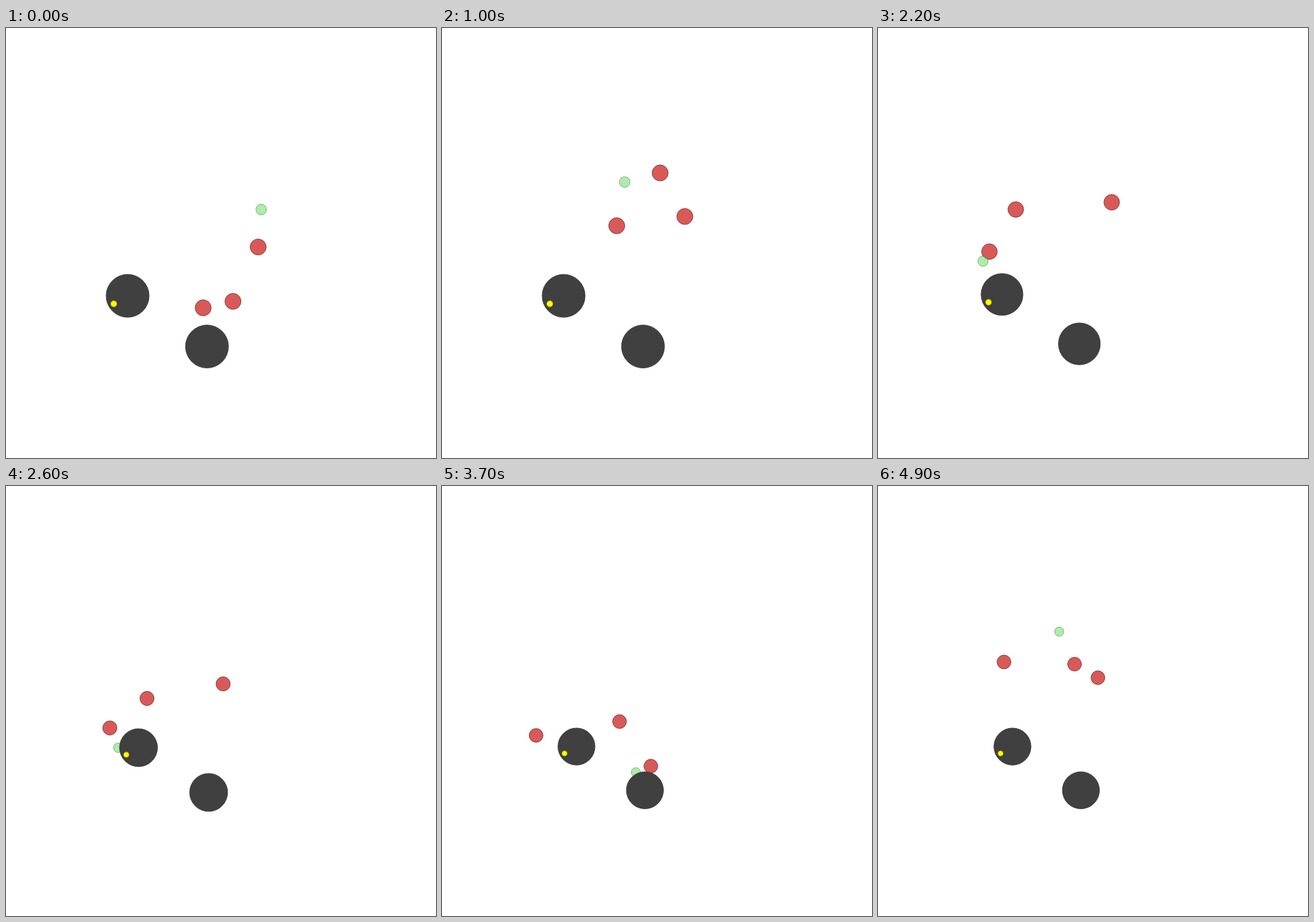
Write an HTML page with a canvas that moves like this. It is 700 by 700 pixels and loops after 5 s.

```html
<!DOCTYPE html>
<html>
<head>
<meta charset="utf-8">
<style>
html, body { margin: 0; height: 100%; overflow: hidden; background: #fff; }
canvas { display: block; }
</style>
</head>
<body>
<canvas id="stage" width="700" height="700"></canvas>
<script>
const ctx = document.getElementById('stage').getContext('2d');
const STEP = 100, STEPS = 50;
const obstacles = [[-152, 86], [-22.8, 168.5]];
const food = [-174.5, 99];

// Key steps shared by all bodies; positions are relative to the stage centre
const keys = [0, 5, 15, 22, 30, 37, 42, 49];
const chaser = { r: 13.1, fill: '#d95959', line: 'rgba(90,36,36,.75)' };
const bodies = [
  { ...chaser, x: [60.5, 60.5, -66, -129, -125.7, -70.7, -48, -34.8],
    y: [6.5, -62.6, -128.5, -56, 36, 38.8, 22, -69.6] },
  { ...chaser, x: [19.5, 19.5, 65, 31.3, -17.4, -11.6, -6, 9.3],
    y: [95, 26, -87.5, -68, 18, 123, 53, -44] },
  { ...chaser, x: [-29, -28.8, -116, -173, -228, -228.2, -211, -168],
    y: [105.5, 36.4, -56.5, 14.4, 73, 65, 21, -73.6] },
  { r: 8.7, fill: 'rgba(89,217,89,.5)', line: 'rgba(44,108,44,.5)',
    x: [65.5, 30, -136.5, -183.8, -155, -40, -48, -63.8],
    y: [-54.5, -111, -50.5, 30.3, 130.3, 134.5, 20, -131] }
];

const slope = (p, i) => (p[i + 1] - p[i]) / (keys[i + 1] - keys[i]);

function tangent(p, i) {
  if (i === 0) return slope(p, 0);
  if (i === keys.length - 1) return slope(p, i - 1);
  const before = keys[i] - keys[i - 1], after = keys[i + 1] - keys[i];
  return (slope(p, i - 1) * after + slope(p, i) * before) / (before + after);
}

// Smooth curve through the key positions
function along(p, k) {
  const i = keys.findLastIndex((key, n) => key <= k && n < keys.length - 1);
  const h = keys[i + 1] - keys[i], u = (k - keys[i]) / h, v = 1 - u;
  return v * v * (1 + 2 * u) * p[i] + u * u * (3 - 2 * u) * p[i + 1] +
    h * u * v * (v * tangent(p, i) - u * tangent(p, i + 1));
}

// Soft contact: bodies slide around the obstacles
function place(body, k) {
  let x = along(body.x, k), y = along(body.y, k);
  for (const [ox, oy] of obstacles) {
    const push = Math.max(1, (29 + body.r) / Math.hypot(x - ox, y - oy));
    x = ox + (x - ox) * push;
    y = oy + (y - oy) * push;
  }
  return [x, y];
}

function disc([x, y], r, fill, line, zoom) {
  ctx.beginPath();
  ctx.arc(350 + x * zoom, 350 + y * zoom, r * zoom, 0, 2 * Math.PI);
  ctx.fillStyle = fill;
  ctx.fill();
  ctx.strokeStyle = line;
  ctx.stroke();
}

function draw(now) {
  const k = Math.floor(now / STEP) % STEPS;
  const zoom = 1 / Math.min(1.1594, Math.max(1, 1 + 0.0264 * (k - 21)));
  ctx.clearRect(0, 0, 700, 700);
  for (const b of bodies) disc(place(b, k), b.r, b.fill, b.line, zoom);
  for (const o of obstacles) disc(o, 35, '#404040', '#404040', zoom);
  disc(food, 5.2, '#ff0', '#7f7f00', zoom);
}

const start = performance.now();
function tick() {
  draw(performance.now() - start);
  requestAnimationFrame(tick);
}
tick();
</script>
</body>
</html>
```
